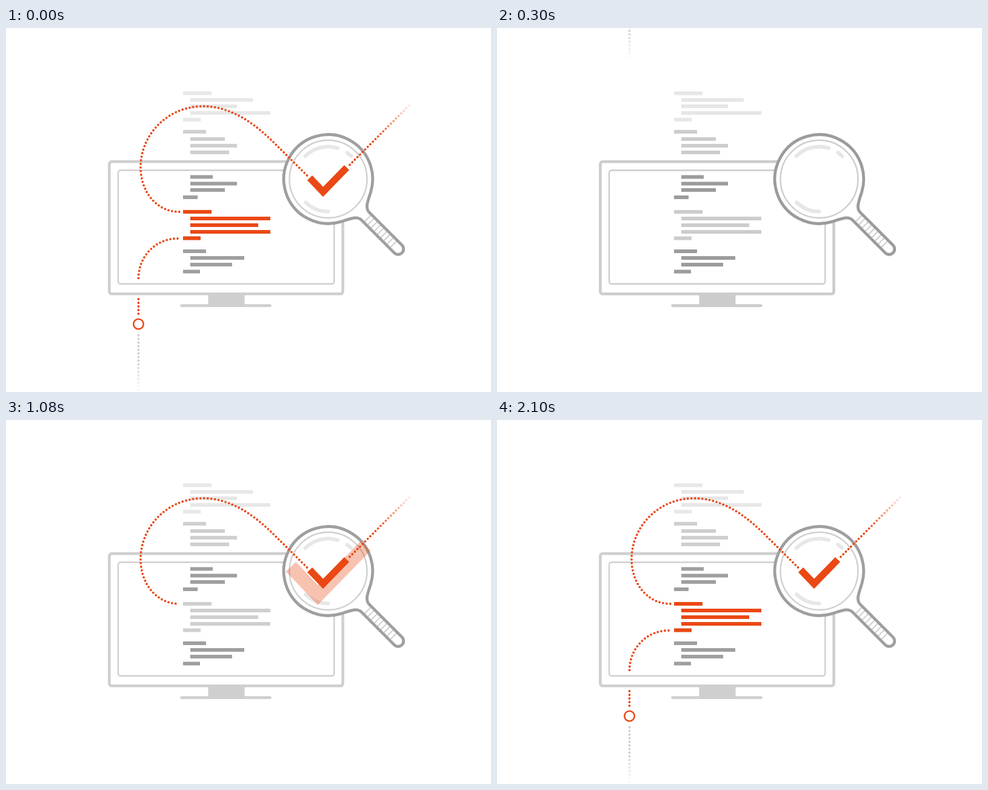
An HTML page with a canvas that plays this animation: 800 px wide and 600 px high, repeating every 2490 ms.

```html
<!DOCTYPE html>
<html lang="en">
<head>
<meta charset="utf-8">
<title>Code review</title>
<style>
  html, body { margin: 0; width: 100%; height: 100%; overflow: hidden; background: #fff; }
  canvas { display: block; }
</style>
</head>
<body>
<canvas id="stage" width="800" height="600"></canvas>
<script>
const LOOP = 2490, STEP = 30, TRAVEL = 550;
const ORANGE = '#ea4814', LIGHT = '#e7e7e7', MID = '#cfcfcf', DARK = '#9f9f9f';
const LENS = { x: 531.5, y: 249, r: 73.3 };

// Each bar: left, right, vertical centre
const bars = {
  [LIGHT]: [[292, 339, 107.5], [304, 407, 118.5], [304, 381, 129], [304, 436, 140], [292, 321, 151]],
  [MID]: [[292, 330, 171], [304, 361, 183], [304, 381, 194], [304, 368, 205]],
  [DARK]: [[304, 341, 245.5], [304, 381, 256.5], [304, 361, 267], [292, 316, 279],
           [292, 330, 368], [304, 393, 379], [304, 373, 390], [292, 320, 401.5]]
};
// Highlighted bars also carry start time and duration
const marked = [
  [292, 339, 303, 1110, 120], [304, 436, 314, 1144, 248], [304, 416, 325, 1243, 248],
  [304, 436, 336, 1342, 248], [292, 321, 346.5, 1441, 248]
];

const clamp = v => Math.min(1, Math.max(0, v));
const progress = (t, start, duration) => clamp((t - start) / duration);
const easeInOut = u => u < .5 ? 4 * u ** 3 : 1 - 4 * (1 - u) ** 3;
const bump = u => Math.sin(Math.PI * u);

function dotsAlong(d, gap = 6) {
  const path = document.createElementNS('http://www.w3.org/2000/svg', 'path');
  path.setAttribute('d', d);
  const count = Math.floor(path.getTotalLength() / gap) + 1;
  return Array.from({ length: count }, (_, i) => path.getPointAtLength(i * gap));
}
const trails = {
  entry: dotsAlong('M567 225.5L668 124.5').reverse(),
  loop: dotsAlong('M496.5 243L440 187C405 153 368 129 325 129C268 129 222 174 222 230C222 268 247 303 286 303'),
  exit: dotsAlong('M283 347C247 347 218.5 376 218.5 413'),
  drop: dotsAlong('M218.5 447V472'),
  tail: dotsAlong('M218.5 506.5V598')
};

const stage = document.getElementById('stage').getContext('2d');
const strip = document.createElement('canvas');
strip.width = 800;
strip.height = 600 + TRAVEL;

function line(c, color, width, cap = 'butt') {
  c.strokeStyle = color;
  c.lineWidth = width;
  c.lineCap = cap;
}

function bar(c, color, left, right, y) {
  c.fillStyle = color;
  c.fillRect(left, y - 3, right - left, 6);
}

function roundBox(c, x, y, w, h, r) {
  c.beginPath();
  c.roundRect(x, y, w, h, r);
  c.stroke();
}

function arc(c, r, from, to) {
  c.beginPath();
  c.arc(LENS.x, LENS.y, r, from * Math.PI / 180, to * Math.PI / 180);
  c.stroke();
}

function dots(c, points, p, color, opacity = () => 1) {
  c.fillStyle = color;
  points.slice(0, Math.round(p * points.length)).forEach(({ x, y }) => {
    c.globalAlpha = clamp(opacity(y));
    c.beginPath();
    c.arc(x, y, 1.9, 0, 7);
    c.fill();
  });
  c.globalAlpha = 1;
}

function monitor(c) {
  line(c, MID, 4.6);
  roundBox(c, 170.4, 220.3, 385.2, 218, 4);
  line(c, MID, 2.4);
  roundBox(c, 185, 234.5, 356.3, 187.2, 4);
  c.fillStyle = MID;
  c.fillRect(333.5, 440, 60, 17);
  line(c, MID, 4.6, 'round');
  c.beginPath();
  c.moveTo(289.5, 457.6);
  c.lineTo(435.5, 457.6);
  c.stroke();
}

function magnifier(c) {
  const neck = 28 * Math.PI / 180;
  c.save();
  c.translate(LENS.x, LENS.y);
  c.rotate(Math.PI / 4);
  c.beginPath();
  c.arc(0, 0, LENS.r, neck, -neck);
  c.bezierCurveTo(72.2, -20.3, 76, -9, 87, -9);
  c.lineTo(163, -9);
  c.arc(163, 0, 9, -Math.PI / 2, Math.PI / 2);
  c.lineTo(87, 9);
  c.bezierCurveTo(76, 9, 72.2, 20.3, LENS.r * Math.cos(neck), LENS.r * Math.sin(neck));
  c.closePath();
  c.fillStyle = '#fff';
  c.fill();
  line(c, MID, 2);
  for (let u = 92; u < 156; u += 7.5) {
    c.strokeRect(u, -7, 0, 14);
  }
  line(c, DARK, 4.8);
  c.stroke();
  c.restore();

  line(c, MID, 2.4);
  arc(c, 64, 0, 360);
  line(c, LIGHT, 6, 'round');
  arc(c, 53.5, -135, -73);
  arc(c, 53.5, -54.5, -45);
  arc(c, 53.5, 90, 134);
}

function check(c, scale, alpha, drawn = 1) {
  c.save();
  c.globalAlpha = alpha;
  c.translate(531.5, 252);
  c.scale(scale, scale);
  line(c, ORANGE, 11.3);
  c.setLineDash([drawn * 88, 999]);
  c.beginPath();
  c.moveTo(30.5, -22);
  c.lineTo(-8.5, 18);
  c.lineTo(-30.5, -5);
  c.stroke();
  c.restore();
}

function scene(c, t) {
  monitor(c);
  for (const color in bars) bars[color].forEach(b => bar(c, color, ...b));
  marked.forEach(([left, right, y, start, duration]) => {
    bar(c, MID, left, right, y);
    bar(c, ORANGE, left, left + (right - left) * progress(t, start, duration), y);
  });
  magnifier(c);

  dots(c, trails.entry, progress(t, 460, 170), ORANGE, y => (y - 120) / 62);
  const ghost = progress(t, 960, 700);
  if (ghost > 0 && ghost < 1) check(c, 1 + 1.93 * (1 - (1 - ghost) ** 4), .4 * (1 - ghost));
  const drawn = progress(t, 620, 140);
  if (drawn) check(c, 1 + .12 * bump(progress(t, 770, 200)), 1, drawn);

  dots(c, trails.loop, easeInOut(progress(t, 740, 390)), ORANGE);
  dots(c, trails.exit, progress(t, 1680, 180), ORANGE);
  dots(c, trails.drop, progress(t, 1850, 60), ORANGE);
  const pop = progress(t, 1890, 180);
  if (pop) {
    line(c, ORANGE, 2.5);
    c.beginPath();
    c.arc(218.5, 488, 8.3 * (pop + 1.25 * bump(pop)), 0, 7);
    c.stroke();
  }
  dots(c, trails.tail, progress(t, 1950, 150), MID, y => (606 - y) / 60);
}

function scrolled(t) {
  return 1 - (1 - progress(t, 100, 210) ** 1.5) ** 4.25;
}

// Average several positions within the shutter time
function scroll(t) {
  const samples = 24, shutter = 17;
  for (let i = 0; i < samples; i++) {
    const moment = t + shutter * (i / (samples - 1) - .5);
    stage.globalAlpha = 1 / (i + 1);
    stage.drawImage(strip, 0, -TRAVEL * scrolled(moment));
  }
  stage.globalAlpha = 1;
}

function prepareStrip() {
  const c = strip.getContext('2d');
  c.fillStyle = '#fff';
  c.fillRect(0, 0, strip.width, strip.height);
  scene(c, Infinity);
  c.translate(0, TRAVEL);
  scene(c, 0);
}

function frame(now) {
  const t = Math.floor(now % LOOP / STEP) * STEP;
  stage.fillStyle = '#fff';
  stage.fillRect(0, 0, 800, 600);
  if (t < 120) scene(stage, Infinity);
  else if (t < 330) scroll(t);
  else scene(stage, t);
  requestAnimationFrame(frame);
}

prepareStrip();
requestAnimationFrame(frame);
</script>
</body>
</html>
```
